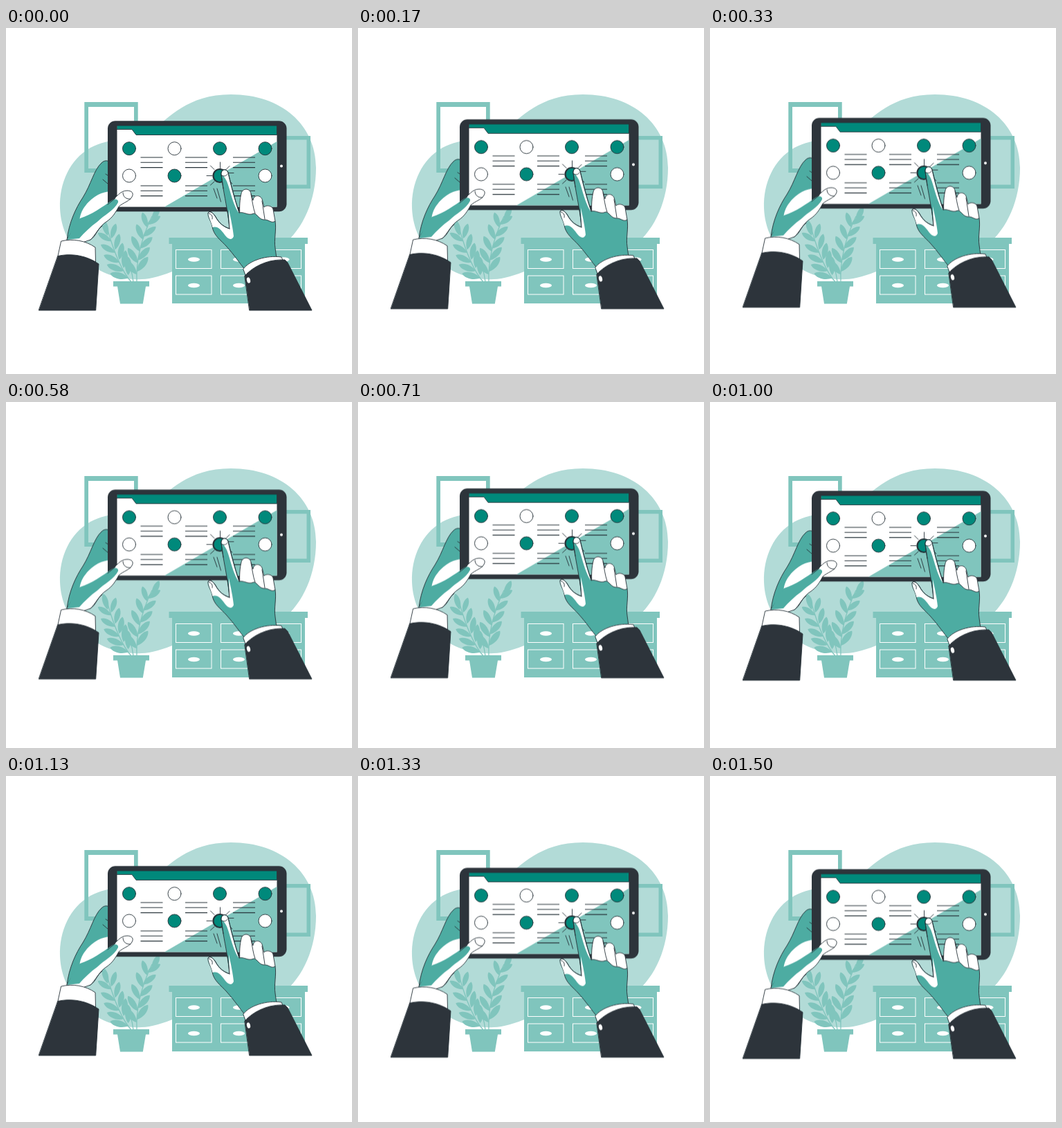
Recreate the animation shown at these times as an HTML page. Size 500 by 500 pixels, loop 1.54 s.

```html
<!DOCTYPE html>
<html lang="en">
<head>
<meta charset="utf-8">
<title>Tablet in hands</title>
<style>
  html, body { margin: 0; width: 100%; height: 100%; overflow: hidden; background: #fff; }
  svg { display: block; width: 100vw; height: 100vh; }
  .pale { fill: #b2dbd7; }
  .mid { fill: #80c5bd; }
  .skin { fill: #4daca2; }
  .green { fill: #00897b; }
  .dark { fill: #2d343b; }
  .white { fill: #fff; }
  .ink { stroke: #263238; stroke-width: .9; stroke-linecap: round; stroke-linejoin: round; }
  .line { fill: none; }
  .drawer { fill: none; stroke: #fff; stroke-width: 1; }
  #stems { fill: none; stroke: #80c5bd; stroke-width: 1.3; }
  #rows { stroke-width: 1.1; stroke-linecap: butt; }
  #float { animation: float 1540ms linear infinite; }
  @keyframes float {
    0%, 100% { transform: translateY(0); }
    46.75% { transform: translateY(-9.47px); }
    96.8% { transform: translateY(.53px); }
  }
</style>
</head>
<body>
<svg viewBox="0 0 500 500">
  <path class="pale" d="M78 260C77 224 92 190 122 173C150 158 185 162 212 147C235 131 262 96 325 96C398 96 448 140 448 202C448 248 430 290 400 314C340 330 290 336 240 352C215 362 200 364 185 363C131 362 80 320 78 260Z"/>

  <g class="mid" fill-rule="evenodd">
    <path d="M113.300 107H190.700V209H113.300ZM119 114V203H185V114Z"/>
    <path d="M397 156H440V232H397ZM400 161.500V226.500H434.500V161.500Z"/>
  </g>

  <path id="stems" d="M181 367Q162 345 147 292M189 367Q187 322 211 272M184 367Q183 356 179 345"/>
  <g id="leaves" class="mid"></g>
  <path class="mid" d="M155 366H207V373.500H202L197.800 398.500H165L161 373.500H155Z"/>

  <path class="mid" d="M235.500 303H436V312H432V398H240V312H235.500Z"/>
  <g id="drawers"></g>

  <g id="float">
    <!-- far side of the left hand -->
    <path class="skin ink" d="M88 306C91 281 101 260 111 245C123 226 127 205 138 195C142 191 147 191 150 194V262L122 306Z"/>
    <path class="white" d="M106.500 276C108 262 120 248 133 241C139 238 144 237 150 236V262L128 270Z"/>
    <path class="line ink" d="M140 219L147 225M144 211L147 213"/>

    <!-- tablet -->
    <rect class="dark" x="147" y="134.300" width="258.500" height="131" rx="11"/>
    <rect class="white" x="160.500" y="141" width="231" height="117.500"/>
    <path class="mid" d="M391.500 164V258.500H229Z"/>
    <path class="green ink" d="M160.500 141H391.500V154.500H188L182 146.500H160.500Z"/>
    <circle class="white" cx="398" cy="199.500" r="2"/>
    <g id="icons"></g>
    <path id="rows" class="line ink"/>
    <path class="line ink" d="M309.500 194V204M295.500 199L301 204.500M290 213.500H298M295.500 227L301 222M318 204.500L323 199.500M321 209.500H329M323 221L327 225M300 232L305 246M305 232L310.500 251"/>

    <!-- left hand -->
    <path class="white ink" d="M88 306C95 293 105 282 118 273C131 265 142 260 151 252C160 244 165 235 175 235C182 235 185 239 182 244C179 250 170 252 163 258C158 267 154 274 145 280C135 286 129 300 122 306L105 312Z"/>
    <path class="skin" d="M88.500 306C94 294 100 284 107 275C124 270 140 258 153 249C158 246 163 248 162 252C156 264 142 270 132 280C122 287 113 296 106 304Z"/>
    <path class="white" d="M107 275C112 263 122 250 147 240V251C136 260 120 267 107 275Z"/>
    <path class="line ink" d="M169 238C169 244 174 248 180 247M122 306C131 300 130 293 139 286M147 255L158 246"/>
    <path class="white ink" d="M80 308C96 304 115 307 129 317L129.500 338C110 329 91 327 75 331Z"/>
    <path class="dark ink" d="M75 329.500C95 325 117 329 134 341L129.700 408H47.500Z"/>

    <!-- right hand -->
    <path class="white ink" d="M338 270C337 258 338 247 340 239C342 231 352 231 354 239L357 249C358 240 369 241 370.500 249L373 259C376 255 385 257 386 262L389 279L378 293H345Z"/>
    <path class="line ink" d="M354 240C356 250 357 260 360 268M370 250L374 276"/>
    <path class="skin ink" d="M346 350C337 339 329 327 319 316C310 306 300 300 298 287C297 280 291 273 292 267C295 263 300 268 303 273C308 282 314 287 323 290C322 273 317 250 314 232L311 212C310 204 319 202 321 209C325 226 330 246 337 267C344 265 350 272 358 268C363 268 366 278 374 277C380 277 384 283 389 279C391 292 387 306 389 318L391 333C374 333 357 338 346 350Z"/>
    <path class="white" d="M292.500 267C296 264 300 269 303 274C308 283 315 288 323 290.500L322 262C325 276 328 290 329 301C326 309 319 304 314 296C309 289 304 286 298.500 288C297 280 292 273 292.500 267Z"/>
    <path class="white" d="M311.500 212C311 204 318 203 320.500 209C324 226 330 247 336.500 267C331 261 326 244 322 230C319 219 315 214 311.500 212Z"/>
    <path class="line ink" d="M292 267C295 263 300 268 303 273C308 282 314 287 323 290M314 232L311 212C310 204 319 202 321 209C325 226 330 246 337 267M293 268C297 269 299 272 298 276M312 213C314 215 319 214 320 211M323 290C322 280 321 271 320 264"/>
    <path class="white ink" d="M343 348C352 336 376 328 398 331L401 338C378 337 360 346 347 359Z"/>
    <path class="dark ink" d="M345 358C359 343 380 334 403 335L407 339L442 408H352Z"/>
    <ellipse class="white" cx="350.500" cy="364.500" rx="2.500" ry="4.200" transform="rotate(-15 350.500 364.500)"/>
  </g>
</svg>
<script>
  const put = (id, markup) => document.getElementById(id).innerHTML = markup;

  // Leaves in pairs along a quadratic stem
  function branch([ax, ay], [bx, by], [cx, cy], pairs, size) {
    let out = '';
    const leaf = (x, y, deg, len) => {
      const w = len * .23;
      out += `<path transform="translate(${x} ${y}) rotate(${deg})" d="M0 0C${len * .3} ${-w} ${len * .8} ${-w} ${len} 0C${len * .8} ${w} ${len * .3} ${w} 0 0Z"/>`;
    };
    for (let i = 0; i <= pairs; i++) {
      const t = .12 + .72 * i / pairs, s = 1 - t;
      const x = s * s * ax + 2 * s * t * bx + t * t * cx;
      const y = s * s * ay + 2 * s * t * by + t * t * cy;
      const dir = Math.atan2(s * (by - ay) + t * (cy - by), s * (bx - ax) + t * (cx - bx)) * 180 / Math.PI;
      const len = size * (1.15 - .25 * t);
      leaf(x, y, dir - 40, len);
      leaf(x, y - 4, dir + 36, len);
    }
    leaf(cx, cy + 8, Math.atan2(cy - by, cx - bx) * 180 / Math.PI, size);
    return out;
  }
  put('leaves',
    branch([181, 367], [162, 345], [147, 292], 4, 24) +
    branch([189, 367], [187, 322], [211, 272], 4, 24));

  let drawers = '';
  for (const y of [320.5, 358])
    for (const x of [245.5, 310.5, 375])
      drawers += `<rect class="drawer" x="${x}" y="${y}" width="51.500" height="27"/>
        <ellipse class="white" cx="${x + 26}" cy="${y + 14}" rx="8.500" ry="3.300"/>`;
  put('drawers', drawers);

  let icons = '', rows = '';
  ['1011', '0110'].forEach((row, r) => [...row].forEach((on, c) => {
    const pressed = r && c === 2 ? 'style="stroke-width:2.200"' : '';
    icons += `<circle class="ink ${+on ? 'green' : 'white'}" ${pressed} cx="${178 + 65.5 * c}" cy="${174.2 + 39.3 * r}" r="9.500"/>`;
  }));
  put('icons', icons);

  for (const x of [194.5, 259, 328])
    for (const y of [187, 228])
      for (let i = 0; i < 3; i++) rows += `M${x} ${y + 7.3 * i}h32`;
  document.getElementById('rows').setAttribute('d', rows);
</script>
</body>
</html>
```
